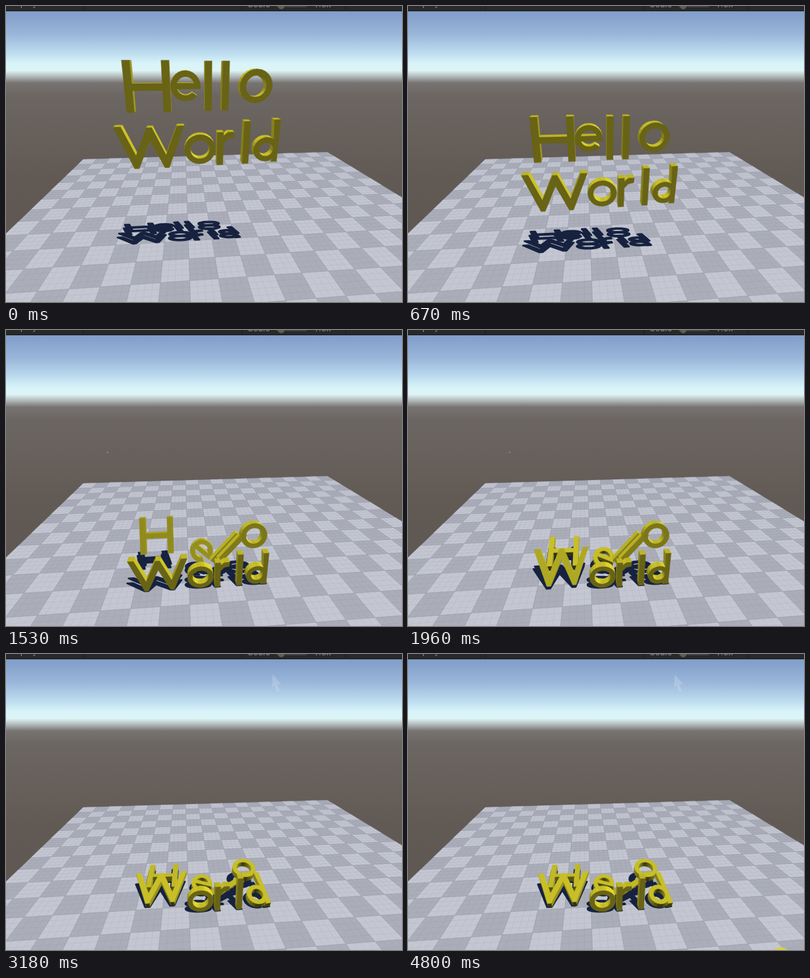
An HTML page that plays this animation: 600 px wide and 450 px high, repeating every 4.9 s.

```html
<!DOCTYPE html>
<html lang="en">
<head>
<meta charset="utf-8">
<title>Hello World</title>
<style>
  html, body { margin: 0; width: 100%; height: 100%; overflow: hidden; background: #655e58; }
  svg { display: block; width: 600px; height: 450px; }
  text { font: 14px Roboto, Arial, sans-serif; fill: #858585; }
</style>
</head>
<body>
<svg viewBox="0 0 600 450">
  <defs>
    <linearGradient id="air" gradientUnits="userSpaceOnUse" x1="0" y1="8" x2="0" y2="450">
      <stop offset="0" stop-color="#809dc9"/>
      <stop offset=".08" stop-color="#9ab6da"/>
      <stop offset=".14" stop-color="#bbdaee"/>
      <stop offset=".18" stop-color="#d9f4f9"/>
      <stop offset=".204" stop-color="#ddf4f5"/>
      <stop offset=".225" stop-color="#b0b7b8"/>
      <stop offset=".247" stop-color="#777371"/>
      <stop offset=".29" stop-color="#6c6662"/>
      <stop offset=".55" stop-color="#625b55"/>
      <stop offset="1" stop-color="#5c554f"/>
    </linearGradient>
  </defs>
  <rect width="600" height="450" fill="url(#air)"/>
  <g id="floor"></g>
  <rect width="600" height="8" fill="#292929"/>
  <path d="M0 7.5H600" stroke="#191919"/>
  <path d="M117.5 0V6M357.5 0V6M514.5 0V6" stroke="#1c1c1c"/>
  <text x="2" y="0">Display 1</text>
  <text x="366" y="2">Scale</text>
  <text x="466" y="2">1.8x</text>
  <path d="M410 1H456" stroke="#4a4a4a" stroke-width="1.5"/>
  <circle cx="417" cy="0" r="5" fill="#5f5f52"/>
  <g id="shade" fill="#16223f" stroke="#16223f" stroke-width="2.5" stroke-linejoin="round"></g>
  <g id="word" stroke-width=".5" stroke-linejoin="round"></g>
  <path id="dot" d="M153 185h2v2h-2z" fill="#8b8580"/>
  <path id="arrow" d="M404 31L417 46L411 46L415 56L411 58L407 48L403 51Z" fill="#dce6f0" opacity=".28"/>
  <circle id="tip" cx="455" cy="450" r="1.5" fill="#222"/>
  <circle id="glow" cx="565" cy="460" r="14" fill="#d9d043"/>
</svg>
<script>
const LOOP = 4900, RAD = Math.PI / 180;
const FOCAL = 383, TILT = 20.2 * RAD, FLOOR = 366, PLANE = 397, YAW = -5, DEPTH = 14;
const LIGHT = [.19, -.93, -.31];
const el = id => document.getElementById(id);
const trace = pts => 'M' + pts.map(p => p[0].toFixed(1) + ' ' + p[1].toFixed(1)).join('L') + 'Z';
const clamp = v => Math.max(0, Math.min(1, v));
const ease = u => u * u * (3 - 2 * u);
const dot = (a, b) => a[0] * b[0] + a[1] * b[1] + a[2] * b[2];

// Camera looks down by TILT; x right, y down, z forward
function project([x, y, z]) {
  const far = z * Math.cos(TILT) + y * Math.sin(TILT);
  const low = y * Math.cos(TILT) - z * Math.sin(TILT);
  return [300 + FOCAL * x / far, 229 + FOCAL * low / far, far];
}

// Floor: 20 columns of tiles seen in perspective
function ground(col, row) {
  const x = -9.46 + col * .9965 + row * .083;
  const z = 20.17 + col * .083 - row * .9965;
  return [300 + 390 * x / z, 88 + 2925 / z];
}
function buildFloor() {
  const rows = 17, tile = (c, r, w, h) =>
    trace([ground(c, r), ground(c + w, r), ground(c + w, r + h), ground(c, r + h)]);
  const line = (a, b) => 'M' + a.map(v => v.toFixed(1)) + 'L' + b.map(v => v.toFixed(1));
  let light = '', fine = '', bold = '';
  for (let r = 0; r < rows; r++)
    for (let c = r % 2; c < 20; c += 2) light += tile(c, r, 1, 1);
  for (let i = 0; i <= 80; i++) {
    const c = line(ground(i / 4, 0), ground(i / 4, rows));
    const r = i <= rows * 4 ? line(ground(0, i / 4), ground(20, i / 4)) : '';
    if (i % 4) fine += c + r; else bold += c + r;
  }
  el('floor').innerHTML =
    `<path d="${tile(0, 0, 20, rows)}" fill="#abaeb9"/><path d="${light}" fill="#c4c7d1"/>` +
    `<path d="${fine}" stroke="#6d7288" stroke-width=".5" opacity=".2"/>` +
    `<path d="${bold}" stroke="#6d7288" stroke-width=".7" opacity=".4"/>`;
}

// Letter outlines: solid parts run clockwise, holes the other way
function arc(cx, cy, r, from, to, steps) {
  return Array.from({ length: steps + 1 }, (_, i) => {
    const a = (from + (to - from) * i / steps) * RAD;
    return [cx + r * Math.cos(a), cy + r * Math.sin(a)];
  });
}
const shapes = {
  H: [[[-33, -37], [-22, -37], [-22, -5], [22, -5], [22, -37], [33, -37],
       [33, 37], [22, 37], [22, 5], [-22, 5], [-22, 37], [-33, 37]]],
  e: [[...arc(0, 0, 22, 40, 360, 22), [22, 4], [-13, 4], ...arc(0, 0, 13.5, 160, 45, 8)],
      arc(0, 0, 13.5, 342, 198, 10)],
  l: [[[-5, -36], [5, -36], [5, 36], [-5, 36]]],
  o: [arc(0, 0, 25, 0, 345, 23), arc(0, 0, 16, 345, 0, 23)],
  W: [[[-54, -35], [-43, -35], [-24, 13], [-4, -33], [4, -33], [24, 13], [43, -35],
       [54, -35], [28, 35], [21, 35], [0, -13], [-21, 35], [-28, 35]]],
  r: [[[-13, -28], [-3, -28], [-3, -22], [4, -28], [14, -28], [14, -19], [4, -17],
       [-3, -9], [-3, 28], [-13, 28]]],
  d: [[[10, -36], [20, -36], [20, 36], [10, 36], ...arc(0, 14, 21, 55, 305, 16)],
      arc(0, 14, 12, 345, 0, 18)]
};

// rest: height at which a letter is caught by the row below.
// lean and end: shift x, y, z, then pitch and roll; the end pose starts at step `from`.
const still = [0, 0, 0, 0, 0];
const letters = [
  { ch: 'H', x: -84, y: 32, rest: 259, lean: [-13, 25, 58, 18, 0], end: [-10, 110, 94, 85, 2], from: 12 },
  { ch: 'e', x: -28, y: 31, rest: 273, lean: [23, 31, 30, 20, 42], end: [23, 80, 60, 75, 20], from: 12 },
  { ch: 'l', x: 6, y: 32, rest: 278, lean: [34, 10, 15, 10, 43], end: [38, 59, 30, 40, 72], from: 20 },
  { ch: 'l', x: 32, y: 32, rest: 278, lean: [21, 10, 15, 10, 43], end: [28, 52, 30, 50, 60], from: 20 },
  { ch: 'o', x: 79, y: 32, rest: 262, lean: [15, 1, 13, 8, 30], end: [9, 68, 73, 74, 40], from: 20 },
  { ch: 'W', x: -86, y: 126, end: [-4, 0, 45, 70, 0], from: 13 },
  { ch: 'o', x: -7, y: 131 },
  { ch: 'r', x: 34, y: 131 },
  { ch: 'l', x: 69, y: 122 },
  { ch: 'd', x: 103, y: 120, end: [2, 0, 25, 70, -6], from: 20 }
];

function turn(a, b, deg) {
  const c = Math.cos(deg * RAD), s = Math.sin(deg * RAD);
  return [a * c - b * s, a * s + b * c];
}
function spin([x, y, z], pitch, roll) {
  [x, y] = turn(x, y, roll);
  [z, y] = turn(z, y, pitch);
  [x, z] = turn(x, z, -YAW);
  return [x, y, z];
}

function poseAt(letter, n) {
  const { x, y, rest = Infinity, lean = still, end = lean, from = 0 } = letter;
  const t = n < 2 ? n * 140 : 470 + 108.2 * (n - 2);
  const fall = 3.1e-4 * Math.max(0, t - 175) ** 2;
  const a = ease(clamp((n - 7) / 5)), b = ease(clamp((n - from) / 6));
  const [dx, dy, dz, pitch, roll] = lean.map((v, i) => v * a + (end[i] - v * a) * b);
  const [px, pz] = turn(x, 0, -YAW);
  const local = shapes[letter.ch][0].flatMap(p => [-1, 1].map(s => spin([...p, s * DEPTH / 2], pitch, roll)[1]));
  const top = FLOOR - Math.max(...local);
  return { at: [px + dx, Math.min(Math.min(y + fall, rest) + dy, top), PLANE + pz + dz], pitch, roll };
}

const area = p => p.reduce((sum, a, i) => {
  const b = p[(i + 1) % p.length];
  return sum + a[0] * b[1] - b[0] * a[1];
}, 0);
function tint(normal) {
  const b = Math.min(1, .2 + .66 * Math.max(0, dot(normal, LIGHT)) + .38 * Math.abs(normal[0]));
  return `rgb(${[232, 222, 46].map(v => Math.round(v * b))})`;
}
const face = (d, color) => `<path d="${d}" fill="${color}" stroke="${color}" fill-rule="evenodd"/>`;

function place(p, z, { at, pitch, roll }) {
  return spin([p[0], p[1], z], pitch, roll).map((v, i) => v + at[i]);
}
function solid(shape, pose) {
  const sides = [], caps = [[], []];
  const normal = v => tint(spin(v, pose.pitch, pose.roll));
  for (const loop of shape) {
    const [f, b] = [-1, 1].map(s => loop.map(p => project(place(p, s * DEPTH / 2, pose))));
    caps[0].push(f);
    caps[1].push(b);
    loop.forEach((p, i) => {
      const j = (i + 1) % loop.length, q = loop[j];
      const quad = [f[i], b[i], b[j], f[j]];
      if (area(quad) <= 0) return;
      const dx = q[0] - p[0], dy = q[1] - p[1], len = Math.hypot(dx, dy) || 1;
      sides.push([quad.reduce((s, v) => s + v[2], 0), face(trace(quad), normal([dy / len, -dx / len, 0]))]);
    });
  }
  sides.sort((a, b) => b[0] - a[0]);
  const seen = area(caps[0][0]) > 0;
  const cap = caps[seen ? 0 : 1].map(trace).join('');
  return sides.map(s => s[1]).join('') + face(cap, normal([0, 0, seen ? -1 : 1]));
}
function shadow(shape, pose) {
  return [-1, 1].map(s => `<path fill-rule="evenodd" d="${shape.map(loop => trace(loop.map(p => {
    const [x, y, z] = place(p, s * DEPTH / 2, pose), drop = FLOOR - y;
    return project([x - .2 * drop, FLOOR, z + .33 * drop]);
  }))).join('')}"/>`).join('');
}

function stepAt(t) {
  if (t < 140) return 0;
  if (t < 470) return 1;
  return Math.min(42, 2 + Math.floor((t - 445) / 108.2));
}
function draw(n) {
  const posed = letters.map(l => [shapes[l.ch], poseAt(l, n)]);
  el('shade').innerHTML = posed.map(p => shadow(...p)).join('');
  el('word').innerHTML = posed.map(p => solid(...p)).join('');
  const show = (id, on) => { el(id).style.display = on ? '' : 'none'; };
  show('dot', n >= 7 && n < 17);
  show('arrow', n >= 18);
  show('tip', n >= 18 && n < 21);
  show('glow', n === 42);
}

let last = -1;
function tick() {
  const n = stepAt(performance.now() % LOOP);
  if (n !== last) draw(last = n);
  requestAnimationFrame(tick);
}
buildFloor();
tick();
</script>
</body>
</html>
```
